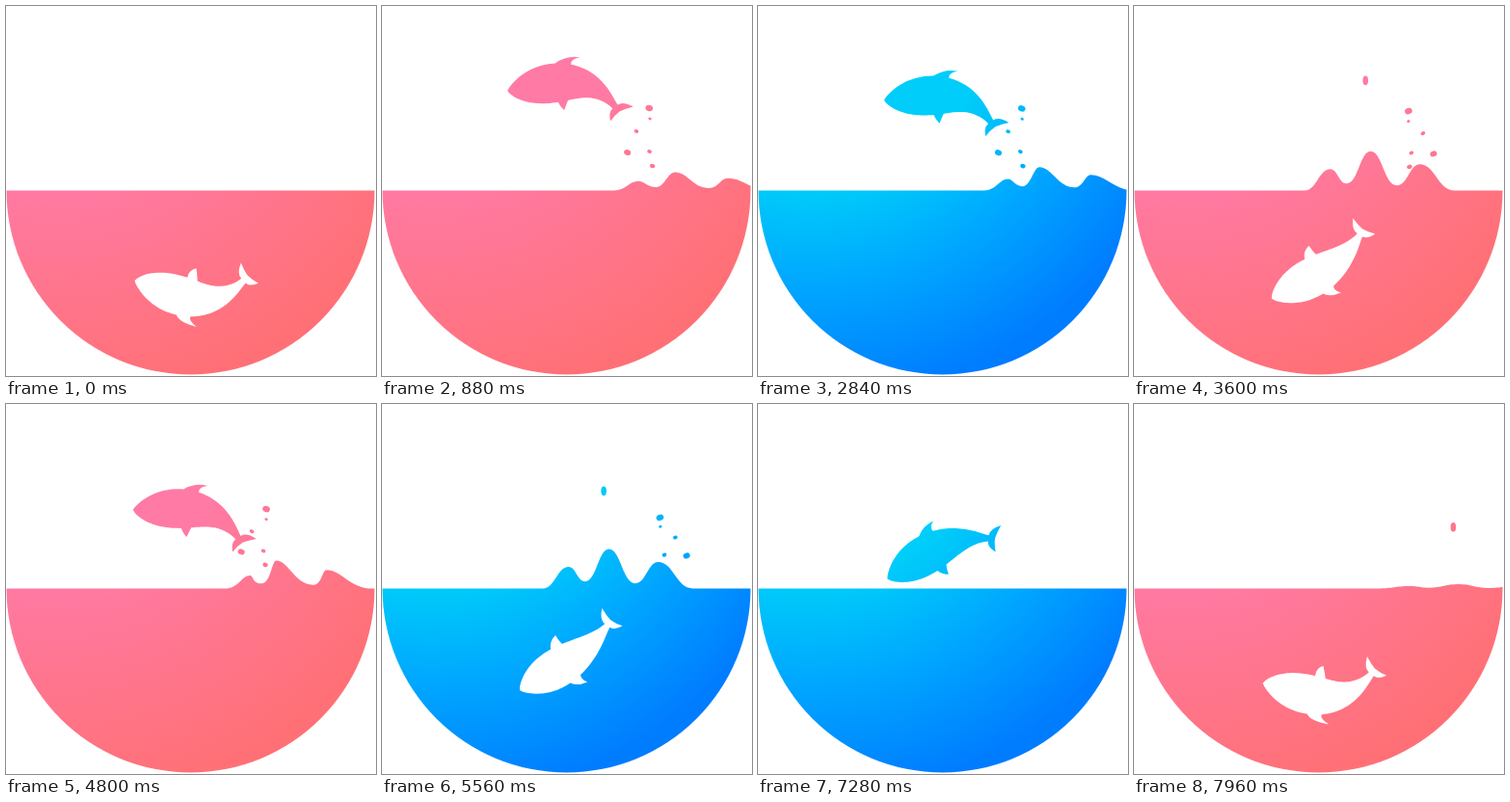
Animation of 384x384 px, one loop 8 s. Source, as an HTML page with a canvas:

```html
<!DOCTYPE html>
<html lang="en">
<head>
<meta charset="utf-8">
<title>Leaping whale</title>
<style>
html, body { margin: 0; width: 100%; height: 100%; overflow: hidden; background: #fff; }
canvas { display: block; }
</style>
</head>
<body>
<canvas id="stage" width="384" height="384"></canvas>
<script>
const ctx = document.getElementById('stage').getContext('2d');
const { sin, cos, PI } = Math;
const CYCLE = 2000, LEVEL = 191.5, LENGTH = 113;

// Whale: one leap per cycle; it pitches with its speed and arches in the air
function whalePose(t) {
  const turn = 2 * PI * t / CYCLE;
  const rise = sin(turn / 2) ** 5;
  return {
    x: 188 + 2 * cos(turn),
    y: 285 - 206 * rise,
    pitch: .68 * sin(turn) * (1 - .45 * rise),
    bend: -16 * cos(turn + .12)
  };
}

// Maps (distance along the spine, height above it) to the stage
function bodyMap({ x, y, pitch, bend }) {
  const c = cos(pitch), s = sin(pitch);
  return (along, up) => {
    const q = Math.min(along, 1);
    const sag = 4.5 * bend * q * (1 - q) * (.4 + 1.2 * q);
    const lean = Math.atan(4.5 * bend * (.4 + 1.6 * q - 3.6 * q * q) / LENGTH);
    const extra = (along - q) * LENGTH;
    const px = (q - .5) * LENGTH + extra * cos(lean) - up * sin(lean);
    const py = sag + extra * sin(lean) + up * cos(lean);
    return [x + px * c + py * s, y + px * s - py * c];
  };
}

const girth = s => 77 * s ** .8 * (1 - s) ** 1.3 + 3.2 * s;

function addWhale(path, t) {
  const pose = whalePose(t), at = bodyMap(pose);
  const side = (from, to, sign) => {
    for (let i = 0; i <= 24; i++) {
      const s = from + (to - from) * i / 24;
      path.lineTo(...at(s, sign * girth(s)));
    }
  };
  const curve = (s1, n1, s2, n2) => path.quadraticCurveTo(...at(s1, n1), ...at(s2, n2));
  const sweep = pose.bend * .003;
  path.moveTo(...at(0, 0));
  side(0, .44, 1);
  curve(.48 + sweep, 28, .57 + sweep, 29 - pose.bend * .15);
  curve(.55, 24, .56, girth(.56));
  side(.56, 1, 1);
  curve(1, 10, 1.1, 15);
  curve(1.07, 7, 1.06, 1);
  curve(1.06, -6, 1.08, -13);
  curve(1, -9, 1, -3.2);
  side(1, .54, -1);
  curve(.52, -23, .54 - sweep, -29);
  curve(.46, -27, .43, -girth(.43));
  side(.43, 0, -1);
  path.closePath();
}

// Three crests that drift right, swell up and sink; tilt makes them curl back
function addWater(path, age, tilt) {
  const quarter = age < 260 ? age / 260 : 1 + (age - 260) / 420;
  const h = quarter > 0 && quarter < 2 ? 41 * sin(quarter * PI / 2) : 0;
  const mid = 174 + .25 * age, lean = -tilt * h, curl = lean * lean;
  const spread = 1 + .25 * (1 - h / 41) ** 2;
  const points = [[-70 + .07 * curl, 0], [-42 + lean + .125 * curl, .55 - .0007 * curl], [-26, .18],
    [lean, 1], [26, .13], [51 + lean, .67], [86, 0]]
    .map(([x, k]) => [mid + x * spread, LEVEL - k * h]);
  path.moveTo(-300, LEVEL);
  path.lineTo(...points[0]);
  for (let i = 1; i < points.length; i++) {
    const [x0, y0] = points[i - 1], [x1, y1] = points[i], dx = x1 - x0;
    const trough = Math.max(.48 * dx, -.9 * lean), crest = (.46 + .012 * lean) * dx;
    const [a, b] = i % 2 ? [trough, crest] : [crest, trough];
    path.bezierCurveTo(x0 + a, y0, x1 - b, y1, x1, y1);
  }
  path.lineTo(900, LEVEL);
  path.lineTo(900, 400);
  path.lineTo(-300, 400);
  path.closePath();
}

// Height of a drop that shoots up, hangs at its top and falls back
const arc = (top, t, up, down) => top + (LEVEL - top) * (t < 0 ? t / up : t / down) ** 4;

function drop(x, y, rx, ry, turn) {
  if (y >= LEVEL) return;
  ctx.beginPath();
  ctx.ellipse(x, y, rx, ry, turn, 0, 2 * PI);
  ctx.fill();
}

// Drops as x, top, radius; lower ones drift faster
const DROPS = [[270, 106, 3.9], [270, 117, 1.7], [255, 130, 2.4],
  [244, 152, 3.6], [267, 151, 2.4], [269, 166, 2.7]];

function spray(age, mirrored) {
  if (age < -130 || age > 300) return;
  for (const [x0, top, r] of DROPS) {
    const x = x0 + (.09 + (top - 106) * .0009) * age;
    const y = arc(top, age - 100, 228, 200);
    drop(mirrored ? 555 - x : x, y, r, r * .8, mirrored ? -.35 : .35);
  }
}

function palette(colors) {
  const g = ctx.createRadialGradient(50, -15, 200, 50, -15, 425);
  colors.forEach((c, i) => g.addColorStop(i / (colors.length - 1), c));
  return g;
}
const FILLS = [palette(['#ff7aa4', '#ff758c', '#ff7076']), palette(['#00cdf9', '#00a4ff', '#007cff'])];

// Glass outline: straight above the level, a half disc below
const glass = new Path2D('M.5 0H382.5V191.5A191 191 0 0 1 .5 191.5Z');

function draw() {
  const now = performance.now(), t = now % CYCLE;
  ctx.fillStyle = '#fff';
  ctx.fillRect(0, 0, 384, 384);
  ctx.save();
  ctx.clip(glass);
  ctx.fillStyle = FILLS[Math.floor((now + 500) / CYCLE) % 2];
  const scene = new Path2D();
  if (t < 1200) addWater(scene, t - 330, .38);
  else addWater(scene, t - 1310, .03);
  addWhale(scene, t);
  ctx.fill(scene, 'evenodd');
  spray(t - 800, false);
  spray(t - 1600, true);
  if (t > 1500) drop(240 + .253 * (t - 1600), arc(76, t - 1650, 150, 380), 2.8, 4.9, 0);
  ctx.restore();
  requestAnimationFrame(draw);
}
draw();
</script>
</body>
</html>
```
